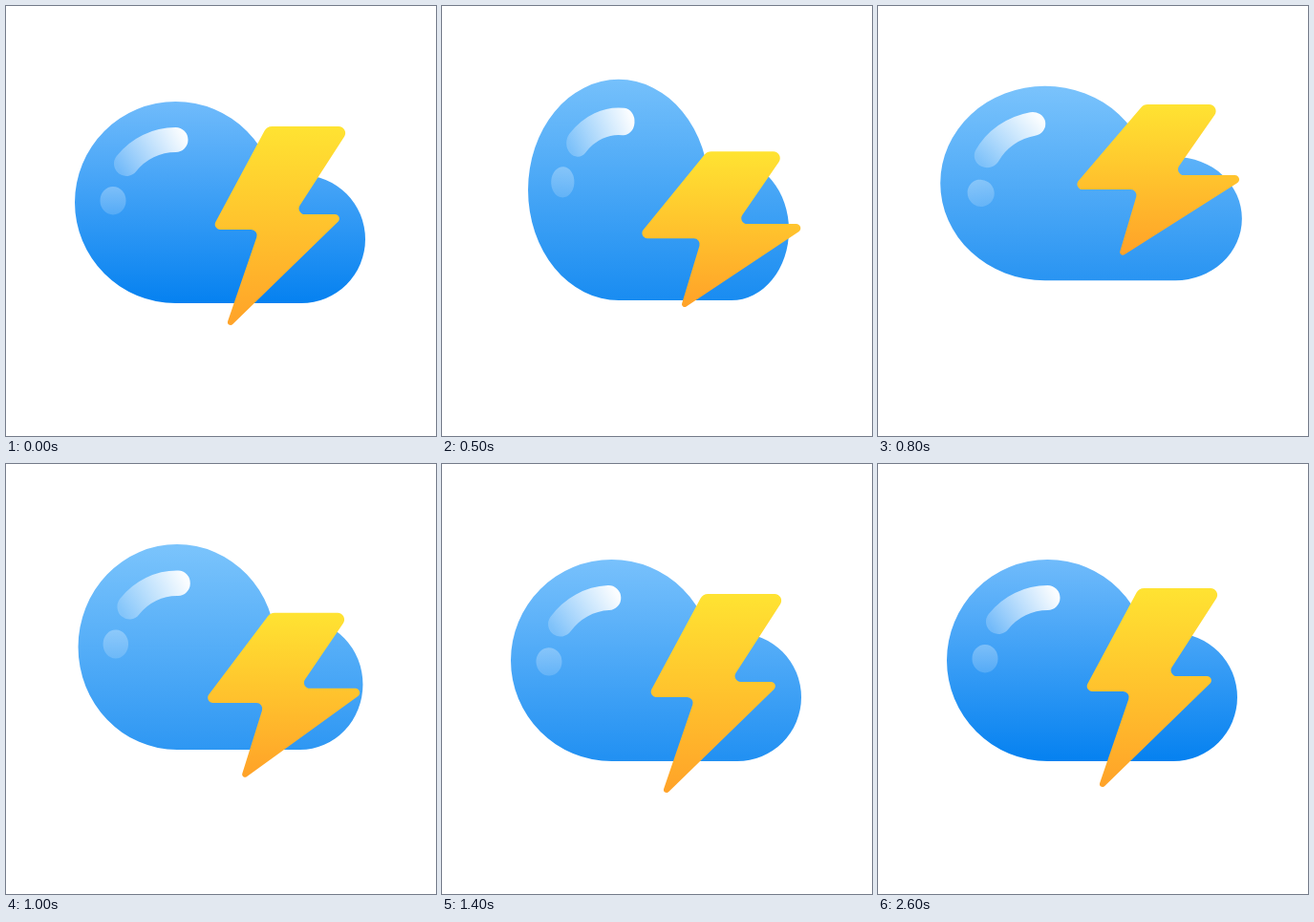
An HTML page with a canvas that plays this animation: 450 px wide and 450 px high, repeating every 2900 ms.

```html
<!DOCTYPE html>
<html lang="en">
<head>
<meta charset="utf-8">
<title>Storm cloud</title>
<style>
html, body { margin: 0; width: 100%; height: 100%; overflow: hidden; background: #fff; }
canvas { display: block; width: 100vw; height: 100vh; }
</style>
</head>
<body>
<canvas id="stage"></canvas>
<script>
const LOOP = 2900, STEP = 100, SIZE = 450;
const canvas = document.getElementById('stage');
const ctx = canvas.getContext('2d');
const ratio = window.devicePixelRatio || 1;
canvas.width = canvas.height = SIZE * ratio;

// Cloud at rest
const TOP = 100, BOTTOM = 311, PIVOT = 249;
const HUB = { x: 177.5, y: 205.5, r: 105.5 };
const LOBE = { x: 309, y: 244, r: 67 };

// Bolt corners: x, y below the top, x and y when squashed, corner radius
const BOLT = [
  [273, 0, 278, 0, 9],
  [361, 0, 360, 0, 7],
  [301.5, 92, 308.5, 74, 6],
  [355.4, 92, 389, 74, 4.5],
  [228, 216, 251, 161.5, 3],
  [265, 108, 272.5, 89, 6],
  [215, 108, 202, 89, 5.5]
];

const mix = (a, b, t) => a + (b - a) * t;
const blend = (a, b, t) => `rgb(${a.map((v, i) => Math.round(mix(v, b[i], t)))})`;

// Eases between [time, value] turning points and holds the last one
const track = (...keys) => time => {
  const i = keys.findIndex(k => k[0] > time);
  if (i < 0) return keys[keys.length - 1][1];
  if (i === 0) return keys[0][1];
  const [t0, a] = keys[i - 1], [t1, b] = keys[i];
  const u = (time - t0) / (t1 - t0);
  return mix(a, b, u * u * (3 - 2 * u));
};

const stretch = track([0, 0], [400, .165], [500, .102], [750, -.045], [1000, .02], [1200, 0]);
const lift = track([450, 0], [700, 28], [1000, 12], [1200, 0]);
const turn = track([0, 0], [420, -7], [800, 11], [1000, -1], [1200, 3.5], [1900, 0]);
const pale = track([0, 0], [1000, .9], [1200, .85], [1800, 0]);
const boltTop = track([0, 126], [500, 152.3], [800, 103], [1000, 155.8], [1200, 138], [1800, 130]);
const squash = track([200, 0], [500, .9], [600, 1.36], [800, 1], [1000, .72], [1200, 0]);

function gradient(x0, y0, x1, y1, ...colors) {
  const g = ctx.createLinearGradient(x0, y0, x1, y1);
  colors.forEach((c, i) => g.addColorStop(i, c));
  return g;
}

const white = alpha => `rgba(255,255,255,${alpha})`;

function drawGloss(degrees) {
  ctx.translate(HUB.x, HUB.y);
  ctx.rotate(-degrees * Math.PI / 180);
  ctx.beginPath();
  ctx.arc(0, 0, 65.5, Math.atan2(-40.5, -51.5), -Math.PI / 2);
  ctx.lineWidth = 26;
  ctx.lineCap = 'round';
  ctx.strokeStyle = gradient(-58, -32, 10, -66, white(.22), white(.97));
  ctx.stroke();
  ctx.beginPath();
  ctx.ellipse(-65.5, -1.8, 13.5, 14.7, 0, 0, Math.PI * 2);
  ctx.fillStyle = gradient(0, -16, 0, 13, white(.3), white(.16));
  ctx.fill();
}

function drawCloud(time) {
  const s = stretch(time), p = pale(time);
  ctx.save();
  ctx.translate(PIVOT, BOTTOM - lift(time));
  ctx.scale(1 - s, 1 + .94 * s);
  ctx.translate(-PIVOT, -BOTTOM);
  ctx.beginPath();
  for (const c of [HUB, LOBE]) {
    ctx.moveTo(c.x + c.r, c.y);
    ctx.arc(c.x, c.y, c.r, 0, Math.PI * 2);
  }
  ctx.rect(HUB.x, LOBE.y, LOBE.x - HUB.x, BOTTOM - LOBE.y);
  ctx.fillStyle = gradient(0, TOP, 0, BOTTOM,
    blend([112, 187, 251], [124, 197, 252], p), blend([5, 129, 240], [50, 153, 243], p));
  ctx.fill();
  drawGloss(turn(time));
  ctx.restore();
}

function drawBolt(time) {
  const top = boltTop(time), q = squash(time);
  const pts = BOLT.map(([x, y, sx, sy, r]) => [mix(x, sx, q), top + mix(y, sy, q), r]);
  ctx.beginPath();
  ctx.moveTo((pts[0][0] + pts[1][0]) / 2, top);
  for (let i = 1; i <= pts.length; i++) {
    const [x, y, r] = pts[i % pts.length];
    const next = pts[(i + 1) % pts.length];
    ctx.arcTo(x, y, next[0], next[1], r);
  }
  ctx.closePath();
  ctx.fillStyle = gradient(0, top, 0, pts[4][1], '#ffe332', '#ffa028');
  ctx.fill();
}

function draw(time) {
  ctx.setTransform(ratio, 0, 0, ratio, 0, 0);
  ctx.fillStyle = '#fff';
  ctx.fillRect(0, 0, SIZE, SIZE);
  drawCloud(time);
  drawBolt(time);
}

const start = performance.now();
function tick() {
  const time = (performance.now() - start) % LOOP;
  draw(Math.floor(time / STEP) * STEP);
  requestAnimationFrame(tick);
}
tick();
</script>
</body>
</html>
```
